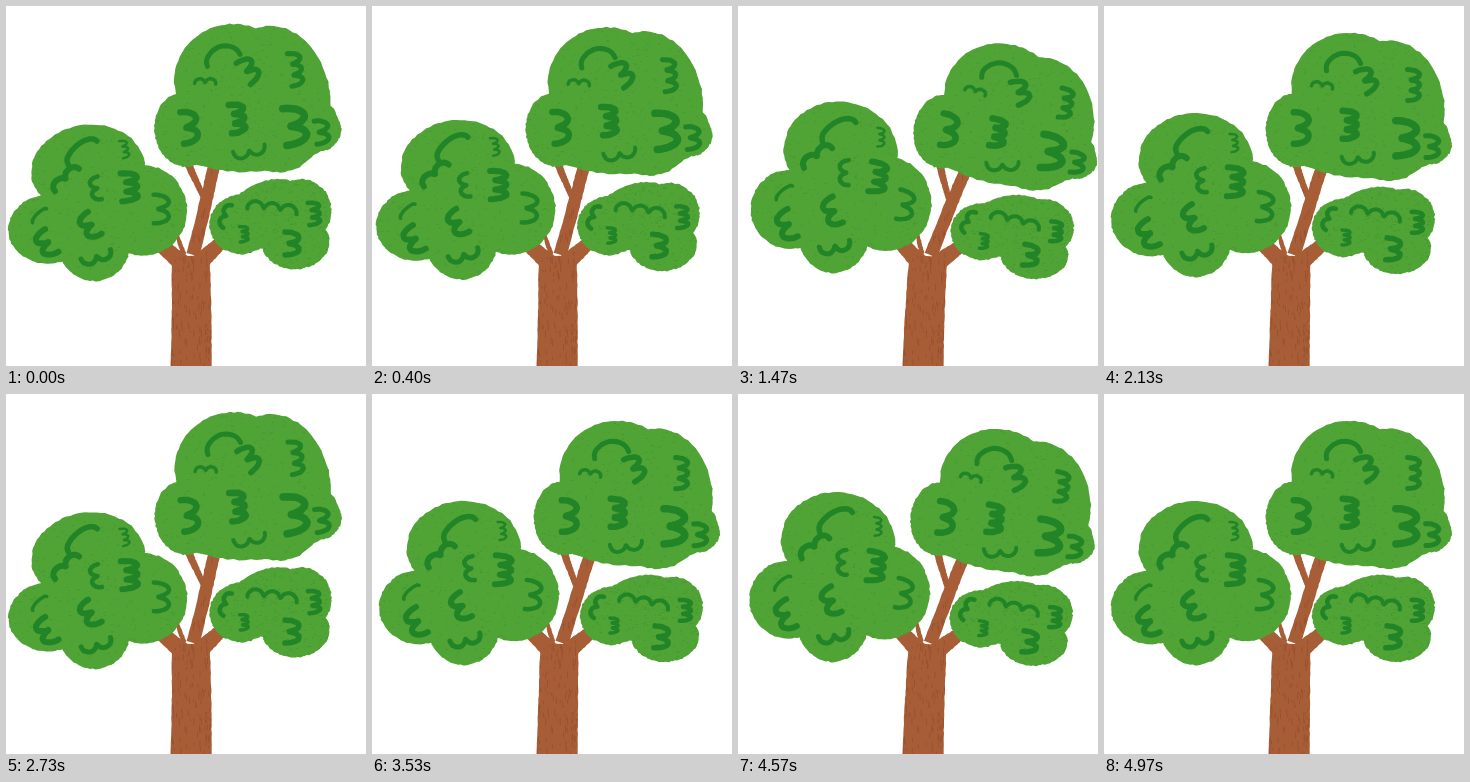
Recreate the animation shown at these times as an HTML page with a canvas. Size 360x360 px, loop 5 s.

```html
<!DOCTYPE html>
<html>
<head>
<meta charset="utf-8">
<title>Swaying tree</title>
<style>
html, body { margin: 0; width: 100%; height: 100%; overflow: hidden; background: #fff; }
canvas { display: block; width: 360px; height: 360px; }
</style>
</head>
<body>
<canvas id="stage" width="360" height="360"></canvas>
<script>
const ctx = document.getElementById('stage').getContext('2d');
const LEAF = '#50a335', LEAF_GRAIN = '#43962f', MARK = '#218528';
const BARK = '#a75d36', BARK_GRAIN = '#985030';
const LOOP = 5000, PERIOD = 2840, BEND = 0.00049, ROOT_X = 185, ROOT_Y = 360;
const TAU = 2 * Math.PI;
const parts = [];

let seed = 7;
function random() {
  seed = (seed * 16807) % 2147483647;
  return seed / 2147483647;
}
const between = (a, b) => a + (b - a) * random();
const rough = (x, y, size) => [x + between(-size, size), y + between(-size, size)];

// A list of count + 1 points, with u running from 0 to 1.
const trace = (count, point) => Array.from({ length: count + 1 }, (_, i) => point(i / count));

// One round lump of a crown.
function lobe(cx, cy, rx, ry) {
  return trace(90, u => rough(cx + rx * Math.cos(TAU * u), cy + ry * Math.sin(TAU * u), 0.6));
}

// Fills the union of the lobes and scatters grain over it.
function crown(...loops) {
  const all = loops.flat(), xs = all.map(p => p[0]), ys = all.map(p => p[1]);
  const specks = trace(450, () => [
    between(Math.min(...xs), Math.max(...xs)),
    between(Math.min(...ys), Math.max(...ys)), between(0.6, 2.2), 0.8]);
  parts.push({ color: LEAF, loops, grain: LEAF_GRAIN, specks });
}

// A tapering piece of wood from one end to the other.
function limb(x1, y1, w1, x2, y2, w2, grain = 0) {
  const length = Math.hypot(x2 - x1, y2 - y1);
  const nx = (y2 - y1) / length, ny = (x1 - x2) / length;
  const at = (u, side) => {
    const off = side * (w1 + (w2 - w1) * u) / 2;
    return [x1 + (x2 - x1) * u + nx * off, y1 + (y2 - y1) * u + ny * off];
  };
  const edge = side => trace(30, u => rough(...at(u, side), 0.3));
  const specks = trace(grain, () => [...at(random(), between(-1, 1)), 0.8, between(2, 8)]);
  parts.push({ color: BARK, loops: [[...edge(1), ...edge(-1).reverse()]], grain: BARK_GRAIN, specks });
}

// A brush stroke of round bumps along a line; a negative bulge flips the side.
function mark(width, x1, y1, x2, y2, bulge, bumps) {
  const dx = x2 - x1, dy = y2 - y1, length = Math.hypot(dx, dy);
  const pts = trace(bumps * 14, u => {
    const p = u * bumps, n = Math.min(Math.floor(p), bumps - 1);
    const along = (n + (1 - Math.cos(Math.PI * (p - n))) / 2) / bumps;
    const inner = p > 0.5 && p < bumps - 0.5 ? 0.3 : 0;
    const out = bulge * Math.max(Math.abs(Math.sin(Math.PI * p)), inner) / length;
    return rough(x1 + dx * along + dy * out, y1 + dy * along - dx * out, 0.2);
  });
  parts.push({ color: MARK, width, loops: [pts] });
}

// Trunk and branches
limb(171, 215, 3, 181, 248, 5);
limb(190, 153, 8, 206, 197, 5);
limb(219, 158, 12, 190, 249, 13, 15);
limb(157, 236, 14, 179, 257, 18);
limb(218, 239, 13, 196, 257, 18);
limb(187.5, 250, 38, 185, 361, 41, 110);

// Upper crown
crown(lobe(245, 80, 57, 53), lobe(285, 105, 56, 70), lobe(192, 124, 30, 37),
  lobe(262, 132, 84, 40), lobe(325, 138, 23, 21));
mark(5, 223, 65, 257, 58, 14, 1);
mark(5.5, 252, 66, 263, 88, 14, 2);
mark(3.5, 208, 80, 229, 83, 5, 2);
mark(5, 304, 64, 304, 95, 12, 3);
mark(6.5, 190, 106, 190, 138, 15, 2);
mark(6.5, 239, 105, 239, 133, 14, 3);
mark(7.5, 292, 115, 292, 150, 21, 2);
mark(5, 322, 130, 322, 152, 13, 2);
mark(4, 238, 151, 270, 147, -8, 2);

// Left crown
crown(lobe(92, 154, 57, 47), lobe(47, 213, 40, 37), lobe(143, 201, 44, 46),
  lobe(92, 232, 36, 39));
mark(5.5, 104, 125, 73, 147, -10, 1);
mark(6, 83, 152, 57, 173, -7, 2);
mark(2.5, 126, 128, 128, 146, 7, 3);
mark(4.5, 101, 162, 103, 186, -9, 2);
mark(6, 124, 161, 123, 190, 16, 3);
mark(4.5, 155, 186, 153, 215, 15, 2);
mark(3.5, 47, 191, 32, 205, -3, 1);
mark(6, 44, 213, 56, 238, -14, 2);
mark(6, 88, 198, 100, 222, -13, 2);
mark(5, 78, 247, 108, 239, -8, 2);

// Right crown
crown(lobe(240, 222, 32, 29), lobe(275, 215, 45, 34), lobe(301, 213, 30, 30),
  lobe(293, 242, 34, 26));
mark(4.5, 232, 203, 222, 224, -6, 2);
mark(3.5, 238, 224, 238, 239, 8, 3);
mark(4, 247, 207, 296, 216, 8, 3);
mark(4.5, 308, 206, 308, 227, 11, 3);
mark(5.5, 283, 232, 282, 254, 14, 2);

// Bends the whole plane into an arc that stays fixed at the root.
function bend([x, y], k) {
  const angle = (ROOT_Y - y) * k, u = x - ROOT_X;
  const sin = Math.sin(angle), cos = Math.cos(angle);
  return [ROOT_X + (1 - cos) / k + u * cos, ROOT_Y - sin / k + u * sin];
}

function drawPart({ color, width, loops, grain, specks }, k) {
  ctx.beginPath();
  for (const loop of loops) {
    loop.forEach((p, i) => ctx[i ? 'lineTo' : 'moveTo'](...bend(p, k)));
  }
  if (width) {
    ctx.strokeStyle = color;
    ctx.lineWidth = width;
    ctx.stroke();
    return;
  }
  ctx.fillStyle = color;
  ctx.fill();
  ctx.save();
  ctx.clip();
  ctx.fillStyle = grain;
  for (const [x, y, w, h] of specks) ctx.fillRect(...bend([x, y], k), w, h);
  ctx.restore();
}

function frame(now) {
  const t = now % LOOP;
  const sway = -Math.cos(TAU * (t + 10) / PERIOD);
  const k = BEND * sway || 1e-9;
  ctx.fillStyle = '#fff';
  ctx.fillRect(0, 0, 360, 360);
  ctx.lineCap = ctx.lineJoin = 'round';
  parts.forEach(part => drawPart(part, k));
  requestAnimationFrame(frame);
}
requestAnimationFrame(frame);
</script>
</body>
</html>
```
